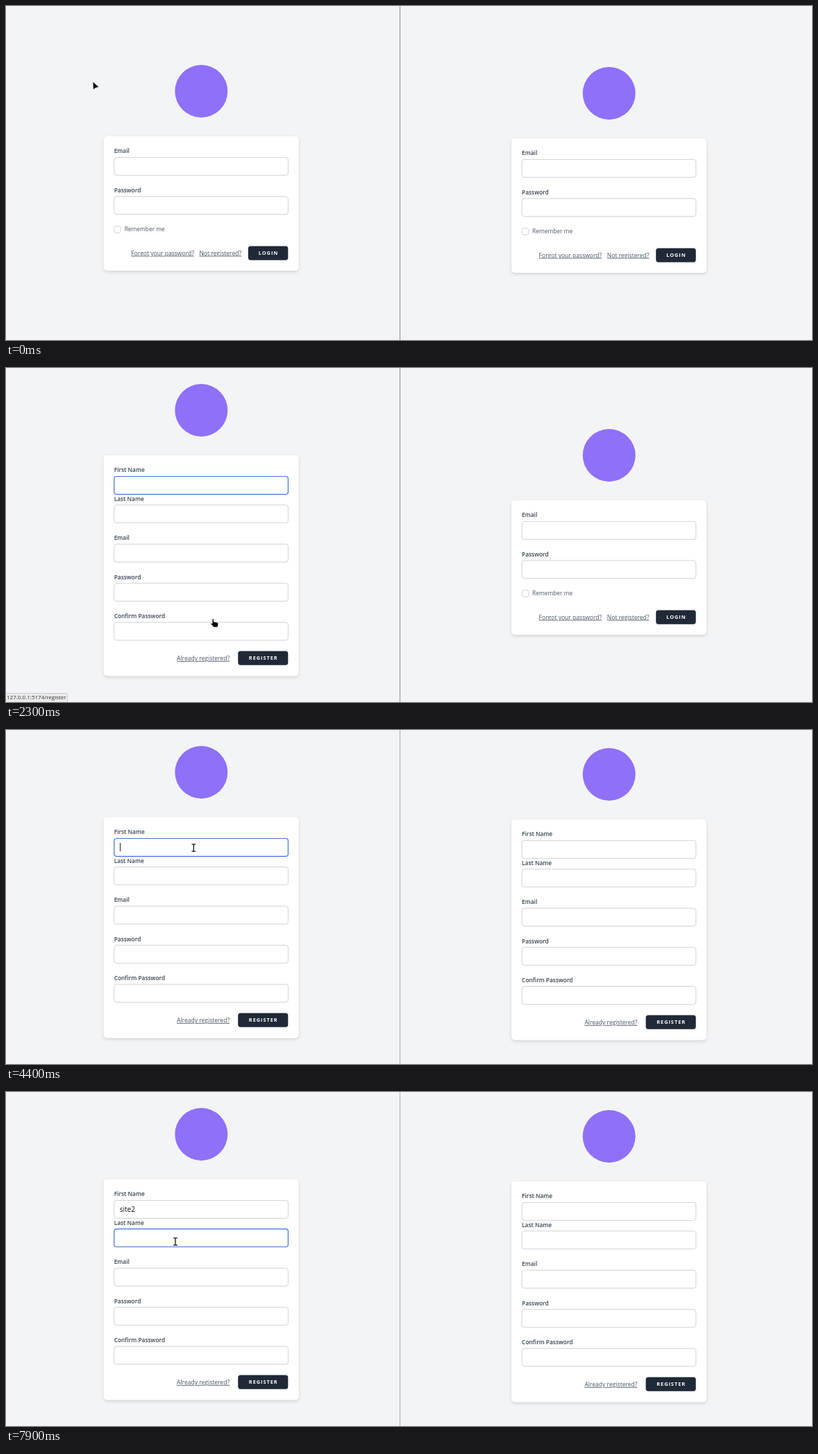
An HTML page that plays this animation: 1161 px wide and 482 px high, repeating every 8000 ms.

```html
<!DOCTYPE html>
<html lang="en">
<head>
<meta charset="utf-8">
<title>Two windows: login and register</title>
<style>
  html, body { margin: 0; width: 100%; height: 100%; overflow: hidden; background: #f3f4f6; }
  svg { display: block; font-family: "Open Sans", "Noto Sans", sans-serif; }
  .logo { fill: #8f70f8; }
  .card { fill: #fff; filter: drop-shadow(0 2px 2px rgba(0, 0, 0, .13)); }
  .field { fill: #fff; stroke: #d1d5db; filter: drop-shadow(0 .8px .7px rgba(0, 0, 0, .09)); }
  .field.focus { stroke: #3f74dc; stroke-width: 1.2; }
  .label { font-size: 8.35px; font-weight: 600; fill: #374151; }
  .note { font-size: 8.4px; fill: #4b5563; }
  .link { font-size: 8.55px; fill: #4b5563; text-decoration: underline; }
  .link.hover { fill: #111827; }
  .button rect { fill: #1f2937; }
  .button.hover rect { fill: #374151; }
  .button text { font-size: 7.4px; font-weight: 700; letter-spacing: .13em; fill: #fff; text-anchor: middle; }
  .typed { font-size: 10px; fill: #111; }
  .caret { fill: #222; }
  .status rect { fill: #ebebec; stroke: #c9cacc; }
  .status text { font-size: 8px; fill: #333; }
  .cursor { stroke: #fff; stroke-width: .8; stroke-linejoin: round; }
</style>
</head>
<body>
<svg id="stage" width="1161" height="482" viewBox="0 0 1161 482">
  <g id="left"></g>
  <g id="right" transform="translate(587.4 3)"></g>
  <rect id="divider" x="567" width="1" height="482"/>
  <g id="leftStatus" class="status">
    <rect x="-1" y="469.5" width="89.5" height="14" rx="1.5"/>
    <text x="1" y="478.3">127.0.0.1:5174/register</text>
  </g>
  <g id="rightStatus" class="status">
    <rect x="567.5" y="470" width="93.5" height="14" rx="1.5"/>
    <text x="570.5" y="479">127.0.0.1:5174/register</text>
  </g>
  <g id="cursor">
    <path id="arrow" class="cursor" d="M0 0L.4 12L3.9 9.4L9 8Z"/>
    <path id="hand" class="cursor" d="M-1 .8Q0-.4 1.2 .8V4.6L6.6 5.8Q8 6.2 7.9 7.6L7 12.6H1.2L-2.9 8Q-2.6 6-1 7.2Z"/>
    <path id="beam" d="M-2.8-5.2H-.8L0-4.5L.8-5.2H2.8M0-4.5V4.5M-2.8 5.2H-.8L0 4.5L.8 5.2H2.8"
      fill="none" stroke="#111" stroke-width="1.3"/>
  </g>
</svg>
<script>
const LOOP = 8000, STEP = 100;
const $ = id => document.getElementById(id);

const field = (label, y) => `
  <text class="label" x="155.7" y="${y - 5.7}">${label}</text>
  <rect class="field" x="155.8" y="${y + .5}" width="250.6" height="25.8" rx="3.5"/>`;
const link = (text, x, y) => `<text class="link" x="${x}" y="${y}">${text}</text>`;
const button = (text, x, y) => `
  <g class="button"><rect x="${x}" y="${y}" width="${406.3 - x}" height="20.3" rx="3.6"/>
  <text x="${(x + 407.3) / 2}" y="${y + 12.8}">${text}</text></g>`;
const frame = (top, height) => `
  <circle class="logo" cx="281.3" cy="${top - 65}" r="38"/>
  <rect class="card" x="140.7" y="${top}" width="281" height="${height}" rx="5"/>`;

const page = `
  <g class="login">${frame(188, 194)}
    ${field("Email", 218)}${field("Password", 274.4)}
    <rect class="field" x="156" y="317.8" width="9.4" height="9.4" rx="2.5"/>
    <text class="note" x="170.7" y="325.2">Remember me</text>
    ${link("Forgot your password?", 180.2, 359.6)}
    ${link("Not registered?", 278.4, 359.6)}
    ${button("LOGIN", 348.8, 346.4)}
  </g>
  <g class="register">${frame(126, 318.5)}
    ${field("First Name", 156)}${field("Last Name", 197.2)}${field("Email", 253.7)}
    ${field("Password", 310.2)}${field("Confirm Password", 366.6)}
    ${link("Already registered?", 246, 421.9)}
    ${button("REGISTER", 334.2, 408.4)}
    <text class="typed" x="163.7" y="172.8"></text>
    <rect class="caret" width="1" height="12"/>
  </g>`;

// pointer path: [time, x, y]
const path = [
  [200, 125, 109], [1000, 375, 356], [1200, 375, 356], [1900, 298, 361.5],
  [2600, 298, 361.5], [2900, 927, 410], [3000, 912, 400], [3400, 903, 361],
  [3600, 901, 360], [3700, 901, 360], [4400, 270.3, 170], [6600, 270.3, 170],
  [7000, 253.7, 201], [7300, 244, 215.8]
];
// pointer shape from each time on
const shapes = [
  [0, "arrow"], [900, "hand"], [1500, "arrow"], [1600, "hand"], [2400, "arrow"],
  [3300, "hand"], [3600, "arrow"], [4300, "beam"], [6800, "arrow"], [7000, "beam"]
];
const keys = [5800, 5900, 6000, 6100, 6700];
const word = "site2";

const within = (t, a, b) => t >= a && t < b;
const show = (el, on) => el.setAttribute("visibility", on ? "visible" : "hidden");
const ease = k => k * k * (3 - 2 * k);

function pointAt(t) {
  const i = path.findIndex(p => p[0] > t);
  if (i === 0) return path[0].slice(1);
  if (i < 0) return path.at(-1).slice(1);
  const [t0, x0, y0] = path[i - 1], [t1, x1, y1] = path[i];
  const k = ease((t - t0) / (t1 - t0));
  return [x0 + (x1 - x0) * k, y0 + (y1 - y0) * k];
}

function makePane(id) {
  const root = $(id), get = s => root.querySelector(s);
  root.innerHTML = page;
  return {
    login: get(".login"), register: get(".register"),
    hoverLink: root.querySelectorAll(".login .link")[1],
    button: get(".login .button"),
    fields: root.querySelectorAll(".register .field"),
    typed: get(".typed"), caret: get(".caret")
  };
}

const left = makePane("left"), right = makePane("right");

function drawPane(pane, s) {
  show(pane.login, !s.registering);
  show(pane.register, s.registering);
  pane.hoverLink.classList.toggle("hover", s.overLink);
  pane.button.classList.toggle("hover", !!s.overButton);
  pane.fields.forEach((f, i) => f.classList.toggle("focus", i === s.focus));
  const text = s.text || "";
  if (pane.typed.textContent !== text) pane.typed.textContent = text;
  const offset = s.focus === 0 && text ? pane.typed.getComputedTextLength() : 0;
  pane.caret.setAttribute("x", 164 + Math.round(offset));
  pane.caret.setAttribute("y", s.focus === 1 ? 204.5 : 163);
  show(pane.caret, s.caret);
}

function draw(t) {
  const firstFocus = within(t, 2300, 3600) || within(t, 4400, 7300);
  drawPane(left, {
    registering: t >= 2300,
    overLink: within(t, 1600, 2300),
    overButton: within(t, 900, 1500),
    focus: firstFocus ? 0 : t >= 7300 ? 1 : -1,
    text: word.slice(0, keys.filter(k => t >= k).length),
    caret: within(t, 2400, 2900) || within(t, 3400, 3600) || within(t, 4400, 5000)
      || within(t, 5600, 7900)
  });
  drawPane(right, {
    registering: t >= 3600,
    overLink: within(t, 3300, 3600),
    focus: within(t, 3600, 4400) ? 0 : -1,
    caret: within(t, 3600, 4100)
  });
  show($("leftStatus"), within(t, 1700, 2700));
  show($("rightStatus"), within(t, 3400, 4000));
  $("divider").setAttribute("fill", t < 2700 || within(t, 3600, 4400) ? "#8b8c8e" : "#a9aaac");

  const [x, y] = pointAt(t);
  $("cursor").setAttribute("transform", `translate(${x} ${y})`);
  const shape = shapes.filter(s => t >= s[0]).at(-1)[1];
  for (const id of ["arrow", "hand", "beam"]) show($(id), id === shape);
}

const start = performance.now();
function tick() {
  const t = (performance.now() - start) % LOOP;
  draw(Math.floor(t / STEP) * STEP);
  requestAnimationFrame(tick);
}
tick();
</script>
</body>
</html>
```
